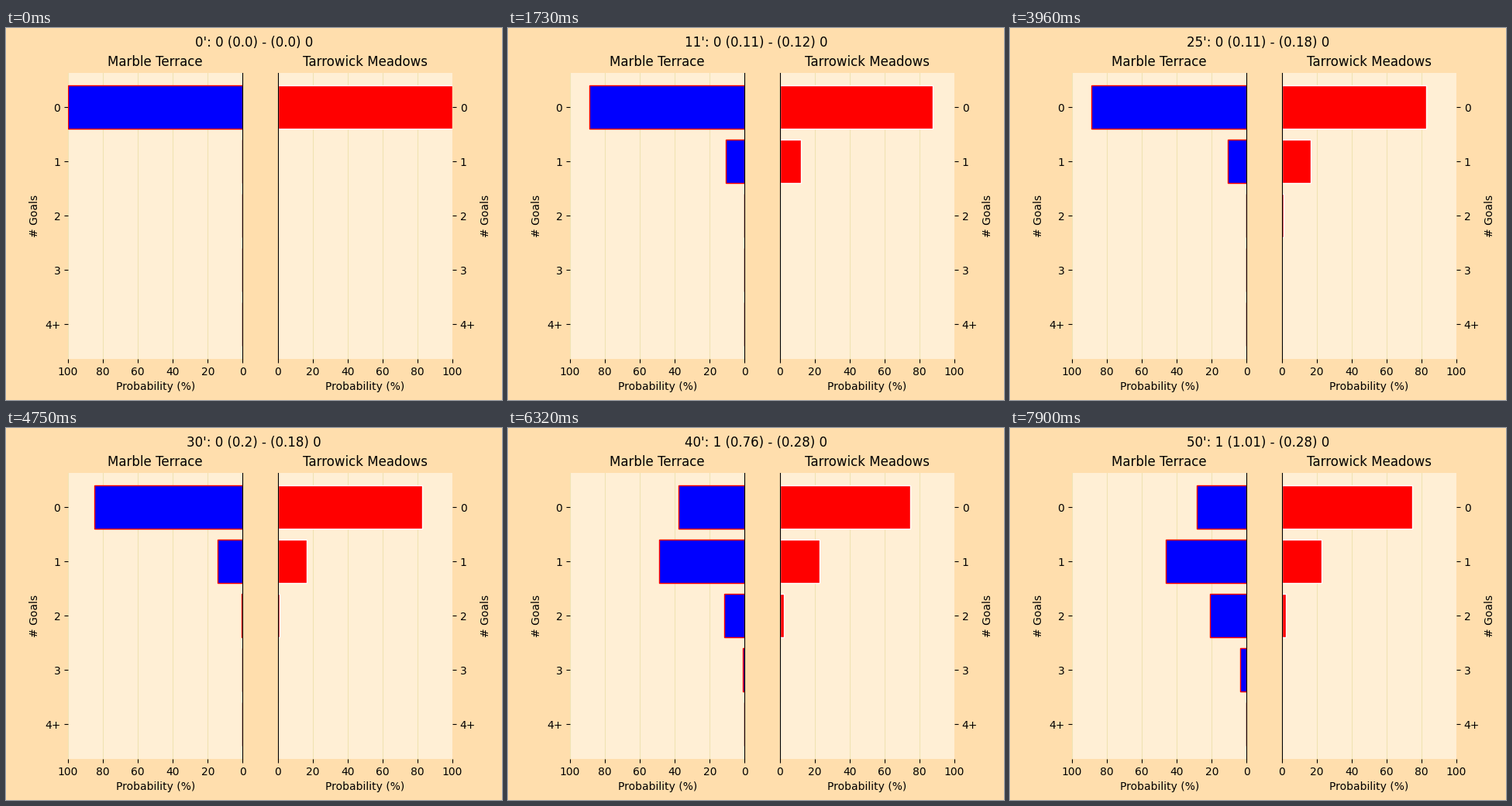
Write a matplotlib script that moves like this. It is 640x480 px and loops after 8000 ms.

```python
import numpy as np
import matplotlib.pyplot as plt
from matplotlib.animation import FuncAnimation

LOOP_MS, STEP_MS = 8000, 25
LEAD_MS = 20                      # sample late in each step
MINUTE_MS, SUB_MS, SUBS = 160, 30, 5

# (minute, side, expected goals, scored)
SHOTS = [
    (4, 1, 0.106, 0), (8, 0, 0.11, 0), (10, 1, 0.0185, 0),
    (20, 1, 0.058, 0), (28, 0, 0.035, 0), (30, 0, 0.053, 0),
    (33, 1, 0.096, 0), (36, 0, 0.505, 1), (39, 0, 0.06, 0),
    (47, 0, 0.247, 0),
]
SHOT_MINUTES = {shot[0] for shot in SHOTS}
TEAMS = [("Marble Terrace", "blue", "red"), ("Tarrowick Meadows", "red", "white")]


def clock(ms):
    """Return the match minute and how far its bar transition has run."""
    minute = 0
    while True:
        shot = minute in SHOT_MINUTES
        length = SUBS * SUB_MS if shot else MINUTE_MS
        if ms < length:
            return minute, (ms // SUB_MS + 1) / SUBS if shot else 1.0
        ms -= length
        minute += 1


def goal_odds(side, minute, progress):
    """Percent chance of 0, 1, 2, 3 and 4+ goals."""
    dist = np.array([1.0])
    for when, who, xg, _ in SHOTS:
        if who == side and when <= minute:
            p = xg * progress if when == minute else xg
            dist = np.convolve(dist, [1 - p, p])
    dist = np.pad(dist, (0, 5))
    return 100 * np.append(dist[:4], dist[4:].sum())


def headline(minute):
    goals, xg = [0, 0], [0.0, 0.0]
    for when, side, value, scored in SHOTS:
        if when <= minute:
            goals[side] += scored
            xg[side] += value
    return (f"{minute}': {goals[0]} ({round(xg[0], 2)}) - "
            f"({round(xg[1], 2)}) {goals[1]}")


def setup(ax, name, fill, edge, axis_side):
    bars = ax.barh(range(5), [0] * 5, color=fill, edgecolor=edge)
    ax.set_title(name)
    ax.set_facecolor("papayawhip")
    ax.set_axisbelow(True)
    ax.grid(axis="x", color="#f0e3b2")
    ax.set_xlim((100, 0) if axis_side == "left" else (0, 100))
    ax.set_ylim(4.64, -0.64)
    ax.set_xticks(range(0, 101, 20))
    ax.set_yticks(range(5), ["0", "1", "2", "3", "4+"])
    ax.set_xlabel("Probability (%)")
    ax.set_ylabel("# Goals")
    if axis_side == "right":
        ax.yaxis.tick_right()
        ax.yaxis.set_label_position("right")
    for side in ("top", "bottom", axis_side):
        ax.spines[side].set_visible(False)
    return bars


fig, axes = plt.subplots(1, 2, figsize=(6.4, 4.8), dpi=100, facecolor="navajowhite")
charts = [setup(ax, *team, side)
          for ax, team, side in zip(axes, TEAMS, ("left", "right"))]
title = fig.suptitle(headline(0))


def update(i):
    minute, progress = clock(i * STEP_MS + LEAD_MS)
    title.set_text(headline(minute))
    for side, bars in enumerate(charts):
        for bar, width in zip(bars, goal_odds(side, minute, progress)):
            bar.set_width(width)
    return [title]


anim = FuncAnimation(fig, update, frames=LOOP_MS // STEP_MS, interval=STEP_MS,
                     repeat=True, repeat_delay=0)
plt.show()
```
